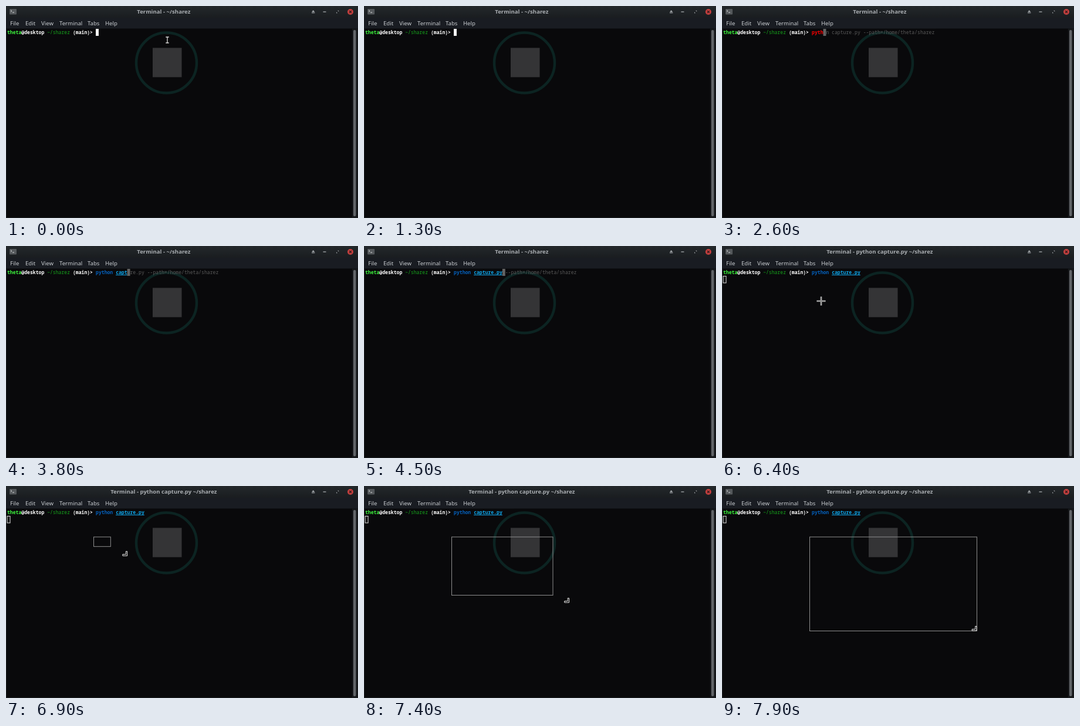
Animation of 600x362 px, one loop 8000 ms. Source, as an HTML page:

```html
<!DOCTYPE html>
<html lang="en">
<head>
<meta charset="utf-8">
<title>Terminal</title>
<style>
  html, body { margin: 0; width: 100%; height: 100%; overflow: hidden; background: #09090b; }
  svg { display: block; width: 600px; height: 362px; }
  text { white-space: pre; }
  .ui { font: 9.6px "Noto Sans", sans-serif; fill: #c9cdd1; }
  #title { font-weight: 700; font-size: 9.6px; fill: #a9adb1; text-anchor: middle; }
  .mono { font: 700 8.12px "Noto Sans Mono", monospace; fill: #fff; }
  .user { fill: #3df53d; }
  .dir { fill: #17a81d; font-weight: 500; }
  #cmd { fill: #0561bd; }
  #cmd.bad { fill: #f00; }
  #arg { fill: #0fa5e9; }
  #hint { fill: #5a5a5a; font-weight: 500; }
</style>
</head>
<body>
<svg viewBox="0 0 600 362">
  <defs>
    <linearGradient id="bar" x1="0" y1="0" x2="0" y2="1">
      <stop offset="0" stop-color="#24282b"/>
      <stop offset="1" stop-color="#1a1d20"/>
    </linearGradient>
  </defs>

  <rect width="600" height="362" fill="#09090b"/>
  <circle cx="273.5" cy="97" r="51.5" fill="none" stroke="#0c2422" stroke-width="4.5"/>
  <rect x="250" y="71.5" width="49.5" height="50" fill="#343436"/>

  <rect width="600" height="20" fill="url(#bar)"/>
  <rect y="20" width="600" height="18.5" fill="#191c22"/>
  <rect x="590" y="38.5" width="10" height="323.5" fill="#15171a"/>
  <rect y="38.5" width="1" height="323.5" fill="#1b1e21"/>
  <rect y="361" width="600" height="1" fill="#1b1e21"/>
  <rect x="592" y="41" width="4.5" height="318" rx="2" fill="#626569"/>

  <rect x="6" y="5" width="12" height="9.5" rx="1" fill="#54585b"/>
  <path d="M8 7l2 1.6-2 1.6M11 11h3" fill="none" stroke="#d5d8da"/>
  <text id="title" class="ui" x="268.8" y="13.4"></text>
  <g id="menu" class="ui"></g>

  <path d="M521 10.3l2.7-3 2.7 3zM521 11.3h5.4v1H521z" fill="#b4b8bb"/>
  <path d="M540.5 10h5" stroke="#b4b8bb" stroke-width="1.2"/>
  <path d="M565.2 7.8h2v2zM563 10.2v2h2z" fill="#b4b8bb"/>
  <circle cx="587" cy="10" r="5" fill="#c5403f"/>
  <path d="M585 8l4 4M585 12l4-4" stroke="#33191b" stroke-width="1.2"/>

  <text class="mono" x="2" y="48"><tspan class="user">theta</tspan>@desktop <tspan class="dir">~/sharez</tspan> (main)&gt; </text>
  <text class="mono" id="cmd" y="48"></text>
  <text class="mono" id="arg" y="48"></text>
  <path id="line" stroke="#0fa5e9" stroke-width="1"/>
  <text class="mono" id="hint" y="48"></text>
  <rect id="caret" y="39" width="4.9" height="12"/>
  <rect id="hollow" x="2" y="51.5" width="5" height="11.5" fill="none" stroke="#e6e6e6"/>

  <rect id="area" x="149.5" y="87" fill="none" stroke="#8f8f8f"/>
  <g id="beam">
    <path d="M272.3 53h5.4M272.3 63h5.4M275 53v10" fill="none" stroke="#000" stroke-width="3"/>
    <path d="M272.3 53h5.4M272.3 63h5.4M275 53v10" fill="none" stroke="#ddd" stroke-width="1.3"/>
  </g>
  <g id="cross" fill="none">
    <path d="M-7.5 0h15M0-7.5v15" stroke="#c4c4c4" stroke-width="2.6"/>
    <path d="M-6.5 0h13M0-6.5v13" stroke="#5e5e5e" stroke-width=".7"/>
  </g>
  <path id="corner" d="M-2.8-8H-.5V-.5H-8.3V-3h5.5z" fill="#09090b" stroke="#eee"/>
</svg>
<script>
const $ = id => document.getElementById(id);
const LOOP = 8000, STEP = 100;
const CELL = 4.872, START = 2 + 31 * CELL;
const CMD = 'python ';
const ARG = 'capture.py';
const FULL = CMD + ARG + ' --path=/home/theta/sharez';
const ENTER = 5500, GRAB = 6000, DRAG = 6700, LAG = 100;

// [time, characters typed by then]
const typed = [
  [0, 0], [2200, 1], [2300, 2], [2500, 3], [2600, 4], [2700, 5], [2800, 6], [3000, 7],
  [3300, 8], [3500, 9], [3800, 11], [3900, 12], [4000, 13], [4100, 14], [4200, 15],
  [4400, 16], [4500, 17]
];
// [time, x, y]
const aim = [[6000, 275, 58], [6200, 218, 79], [6400, 169, 94], [6600, 149.5, 87]];
const drag = [[6700, 149.5, 87], [7000, 236, 136], [7300, 322, 186.5],
  [7400, 350, 199.5], [7600, 408, 232], [7800, 434.5, 247.5]];

const menu = [['File', 7], ['Edit', 33], ['View', 60], ['Terminal', 91], ['Tabs', 139], ['Help', 169]];
$('menu').innerHTML = menu.map(([name, x]) => `<text x="${x}" y="33">${name}</text>`).join('');

const col = n => START + n * CELL;
const show = (id, on) => { $(id).style.display = on ? '' : 'none'; };
const move = (id, [x, y]) => $(id).setAttribute('transform', `translate(${x} ${y})`);

function put(id, text, n) {
  $(id).textContent = text;
  $(id).setAttribute('x', col(n));
}

function along(path, t) {
  const last = path[path.length - 1];
  if (t <= path[0][0]) return path[0].slice(1);
  if (t >= last[0]) return last.slice(1);
  const i = path.findIndex(p => p[0] > t);
  const [t0, x0, y0] = path[i - 1], [t1, x1, y1] = path[i];
  const k = (t - t0) / (t1 - t0);
  return [x0 + (x1 - x0) * k, y0 + (y1 - y0) * k];
}

function draw(t) {
  const n = typed.filter(p => p[0] <= t).pop()[1];
  const split = CMD.length, running = t >= ENTER;
  const arg = ARG.slice(0, Math.max(0, n - split));

  $('title').textContent = running ? 'Terminal - python capture.py ~/sharez' : 'Terminal - ~/sharez';
  put('cmd', CMD.slice(0, n), 0);
  $('cmd').classList.toggle('bad', n < split - 1);
  put('arg', arg, split);
  $('line').setAttribute('d', `M${col(split)} 49.5H${col(split + arg.length)}`);

  put('hint', FULL.slice(n + 1), n + 1);
  show('hint', n > 0 && !running);
  $('caret').setAttribute('x', col(n));
  $('caret').setAttribute('fill', n ? '#626262' : '#fff');
  show('caret', !running);
  show('hollow', running);

  show('beam', t < 1300);
  show('cross', t >= GRAB && t < DRAG);
  move('cross', along(aim, t));
  show('corner', t >= DRAG);
  move('corner', along(drag, t));

  const [x, y] = along(drag, t - LAG);
  $('area').setAttribute('width', x - 149.5);
  $('area').setAttribute('height', y - 87);
  show('area', t > DRAG + LAG);
}

function tick(now) {
  draw(Math.floor(now % LOOP / STEP) * STEP);
  requestAnimationFrame(tick);
}
draw(0);
requestAnimationFrame(tick);
</script>
</body>
</html>
```
